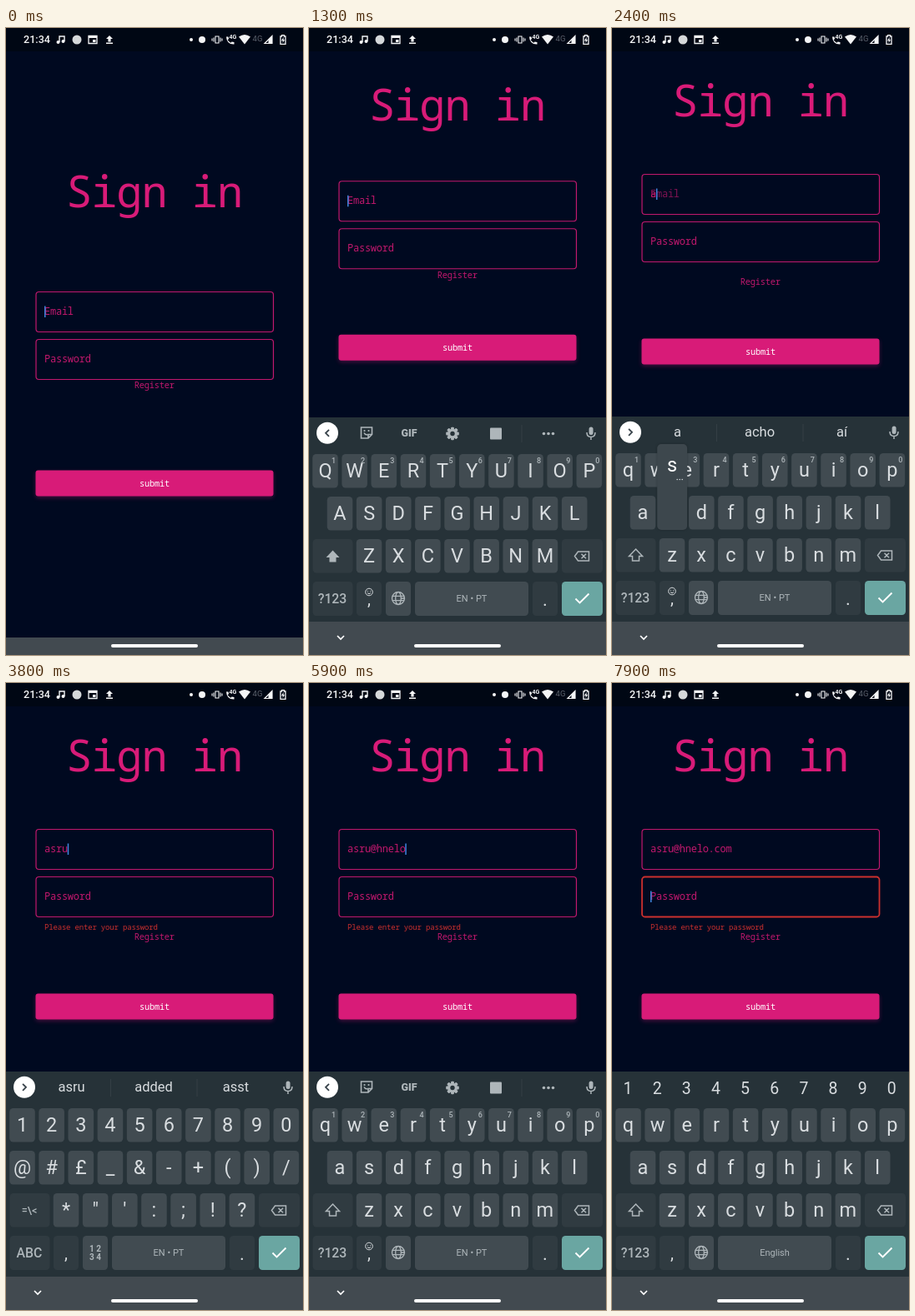
These frames come from a looping animation (356 by 752 pixels, 8000 ms). An HTML page with a canvas:

```html
<!DOCTYPE html>
<html lang="en">
<head>
<meta charset="utf-8">
<title>Sign in</title>
<style>
html, body { margin: 0; width: 100%; height: 100%; overflow: hidden; background: #000920; }
canvas { display: block; width: 356px; height: 752px; }
</style>
</head>
<body>
<canvas id="stage"></canvas>
<script>
const W = 356, H = 752, LOOP = 8000;
const canvas = document.getElementById('stage');
const ctx = canvas.getContext('2d');
const dpr = window.devicePixelRatio || 1;
canvas.width = W * dpr;
canvas.height = H * dpr;

const SANS = 'Roboto, sans-serif';
const MONO = '"Noto Sans Mono", "DejaVu Sans Mono", monospace';
const PINK = '#d81b78', LABEL = '#c2186e', RED = '#cb302e';
const BOARD = '#263238', KEY = '#414b51', DARK = '#303b41', INK = '#d9dde0', DIM = '#aeb6ba';

// Each typed character and the moment it lands in the field
const TYPED = [
  ['a', 2350], ['s', 2430], ['r', 2470], ['u', 2500], ['@', 4150],
  ['h', 5000], ['n', 5420], ['e', 5560], ['l', 5660], ['o', 5760],
  ['.', 6200], ['c', 6850], ['o', 6960], ['m', 7080]
];
const FOCUS_PASSWORD = 7450;

// Vertical places: title baseline, then centres of email, password, link, button
const IDLE = [214.5, 340.5, 397.5, 429, 546];
const RAISED = [110.5, 207.5, 264.5, 296.5, 383];
const CHECKED = [106, 199.5, 256.5, 304.5, 388];

const LETTERS = ['qwertyuiop', 'asdfghjkl', 'zxcvbnm'];
const SYMBOLS = ['1234567890', '@#£_&-+()/', '*"\':;!?'];
const ROW_TOP = [510, 561, 612, 663];
const PITCH = 35.15;

const clamp = v => Math.max(0, Math.min(1, v));
const mix = (a, b, k) => a + (b - a) * k;

function rect(x, y, w, h, r, color) {
  ctx.beginPath();
  ctx.roundRect(x, y, w, h, r);
  ctx.fillStyle = color;
  ctx.fill();
}

function disc(x, y, r, color) {
  ctx.beginPath();
  ctx.arc(x, y, r, 0, Math.PI * 2);
  ctx.fillStyle = color;
  ctx.fill();
}

function text(str, x, y, size, color = INK, weight = 400, align = 'center') {
  ctx.font = `${weight} ${size}px ${SANS}`;
  ctx.textAlign = align;
  ctx.fillStyle = color;
  ctx.fillText(str, x, y);
}

function mono(str, x, y, size, color, align = 'left') {
  ctx.font = `400 ${size}px ${MONO}`;
  ctx.letterSpacing = `${-0.02 * size}px`;
  ctx.textAlign = align;
  ctx.fillStyle = color;
  ctx.fillText(str, x, y);
  ctx.letterSpacing = '0px';
}

function line(d, x, y, color, width = 1.4) {
  ctx.save();
  ctx.translate(x, y);
  ctx.strokeStyle = color;
  ctx.lineWidth = width;
  ctx.stroke(new Path2D(d));
  ctx.restore();
}

function shape(d, x, y, color) {
  ctx.save();
  ctx.translate(x, y);
  ctx.fillStyle = color;
  ctx.fill(new Path2D(d), 'evenodd');
  ctx.restore();
}

function statusBar() {
  rect(0, 0, W, 28, 0, '#000714');
  const c = '#f4f5f6';
  text('21:34', 21, 18.2, 12.6, c, 500, 'left');
  line('M-2 3V-4H4V2', 66, 14, c, 1.4);
  disc(62.5, 17, 2, c);
  disc(68.5, 16, 2, c);
  disc(85, 14, 5.5, '#d5d8da');
  line('M-5-4.5H5V4.5H-5Z', 104, 14, c, 1.3);
  shape('M-5-5H5V-2H-5ZM0 0H3.5V3H0Z', 104, 14, c);
  shape('M0-5L4-1H1.6V2.5H-1.6V-1H-4ZM-4 3.5H4V5H-4Z', 124, 14, c);

  disc(222, 14, 2, c);
  disc(235, 14, 4, c);
  line('M-2-4H2V4H-2ZM-4-2.5V2.5M4-2.5V2.5M-6-1.5V1.5M6-1.5V1.5', 253, 14, c, 1.1);
  shape('M-5-4H-2.5L-2-1.5L-3.3-.3Q-2 2 .4 3.2L1.6 2L4.5 2.6V5Q-4.6 5.4-5-4Z', 269, 14.5, c);
  text('4G', 272, 13, 7, c, 700);
  shape('M0 6L-7-3Q0-8 7-3Z', 286, 13.5, c);
  text('4G', 301.5, 15.5, 9.5, '#5b616c');
  line('M4.5 4.5V-4.5L-4.5 4.5Z', 314.5, 14, c, 1.2);
  shape('M4.5 4.5V-4.5L0 0V4.5Z', 314.5, 14, c);
  line('M-3-4H-1.4V-5.3H1.4V-4H3V5.3H-3Z', 332, 14, c, 1.3);
  shape('M.6-3L-2 1.2H-.3V4L2 0H.6Z', 332, 14, c);
}

function field(cy, color, width) {
  ctx.beginPath();
  ctx.roundRect(36, cy - 24, 284.5, 48, 3.5);
  ctx.strokeStyle = color;
  ctx.lineWidth = width;
  ctx.stroke();
}

function caret(x, cy) {
  rect(x, cy - 7, 1.5, 13.5, 0, '#3f86e0');
}

function form(t, lift) {
  const checked = t >= 2350;
  const [title, email, pass, link, button] =
    IDLE.map((y, i) => checked ? CHECKED[i] : mix(y, RAISED[i], lift));
  const onPass = t >= FOCUS_PASSWORD;
  const value = TYPED.filter(k => t >= k[1]).map(k => k[0]).join('');

  mono('Sign in', 72, title, 52, PINK);

  field(email, LABEL, 1.2);
  field(pass, onPass ? RED : LABEL, onPass ? 1.8 : 1.2);
  ctx.globalAlpha = 1 - clamp((t - 2350) / 150);
  mono('Email', 46, email + 3.3, 12, LABEL);
  ctx.globalAlpha = 1;
  mono(value, 46, email + 3.3, 12, LABEL);
  mono('Password', 46, pass + 3.3, 12, LABEL);

  const resets = [-200, 1200, ...TYPED.map(k => k[1]), FOCUS_PASSWORD];
  const since = resets.filter(r => r <= t).pop();
  if (Math.floor((t - since) / 500) % 2 === 0) {
    if (onPass) caret(46, pass);
    else caret(46 + value.length * 6.93, email);
  }

  ctx.globalAlpha = clamp((t - 2420) / 170);
  mono('Please enter your password', 46, pass + 39.5, 9, RED);
  ctx.globalAlpha = 1;
  mono('Register', 177.7, link + 3, 10.35, LABEL, 'center');

  ctx.save();
  ctx.shadowColor = 'rgba(216,27,120,.32)';
  ctx.shadowBlur = 5 * dpr;
  ctx.shadowOffsetY = 2 * dpr;
  rect(35.5, button - 15.5, 285, 31, 3, PINK);
  ctx.restore();
  mono('submit', 178, button + 3.5, 10.35, '#fff', 'center');
}

function mic() {
  rect(335.6, 477.5, 5, 9.5, 2.5, DIM);
  line('M-5-1Q-5 4.5 0 4.5Q5 4.5 5-1M0 4.5V8', 338, 485, DIM, 1.5);
}

function divider(x) {
  rect(x, 475, 1, 21, 0, '#343f45');
}

function toolbar() {
  disc(22, 484.8, 13, '#fff');
  line('M2-4L-2 0L2 4', 22, 484.8, '#37424a', 1.8);
  line('M-6.5-6.5H6.5V2L2 6.5H-6.5ZM6.5 2H2V6.5M-3 0Q-1.5 3 1 2', 69, 484.5, DIM, 1.6);
  disc(66.5, 482, 1.1, DIM);
  disc(71.5, 482, 1.1, DIM);
  text('GIF', 120, 489, 12.5, DIM, 900);
  for (let i = 0; i < 4; i++) {
    ctx.save();
    ctx.translate(172, 485.5);
    ctx.rotate(i * Math.PI / 4);
    rect(-1.9, -7.8, 3.8, 15.6, 1, DIM);
    ctx.restore();
  }
  disc(172, 485.5, 5.8, DIM);
  disc(172, 485.5, 2.7, BOARD);
  rect(217, 478.5, 14, 14, 1, DIM);
  divider(254.5);
  [281.5, 287, 292.5].forEach(x => disc(x, 485.5, 1.8, DIM));
  mic();
}

function suggestions(words) {
  disc(22, 484.8, 13, '#fff');
  line('M-2-4L2 0L-2 4', 22, 484.8, '#37424a', 1.8);
  words.forEach((w, i) => text(w, 78.5 + i * 98.5, 490.3, 16.5));
  divider(125);
  divider(228.5);
  mic();
}

function keyRow(row, chars, start, hints) {
  const top = ROW_TOP[row];
  [...chars].forEach((ch, i) => {
    const cx = start + i * PITCH;
    rect(cx - 15.3, top, 30.6, 40.5, 4.5, KEY);
    text(ch, cx, top + 27.8, 23.5);
    if (hints) text((i + 1) % 10, cx + 10, top + 10.5, 9, DIM, 500);
  });
}

function bottomRow(mode) {
  const top = ROW_TOP[3];
  const sym = mode === 'symbols', pw = mode === 'password';
  rect(4.5, top, 48, 41, 4.5, DARK);
  text(sym ? 'ABC' : '?123', 28, top + 25.7, 15.8, DIM, 500);
  rect(57, top, 30, 41, 4.5, DARK);
  text(',', 72, top + 28, 20);
  if (mode === 'upper' || mode === 'lower') {
    ctx.beginPath();
    ctx.arc(72, 675.5, 4.3, 0, Math.PI * 2);
    ctx.strokeStyle = INK;
    ctx.lineWidth = 1;
    ctx.stroke();
    line('M-2 1Q0 3.5 2 1M-1.7-1.6V-.6M1.7-1.6V-.6', 72, 675.5, INK, 1);
  }
  rect(92, top, 30, 41, 4.5, KEY);
  if (sym) {
    text('1 2', 107, 682, 10, DIM, 700);
    text('3 4', 107, 692, 10, DIM, 700);
  } else {
    ctx.strokeStyle = DIM;
    ctx.lineWidth = 1.3;
    ctx.beginPath();
    ctx.arc(107, 683, 7.5, 0, Math.PI * 2);
    ctx.ellipse(107, 683, 3.3, 7.5, 0, 0, Math.PI * 2);
    ctx.stroke();
    line('M-7-2.6H7M-7 2.6H7', 107, 683, DIM, 1.3);
  }
  rect(127, top, 136, 41, 4.5, KEY);
  text(pw ? 'English' : 'EN • PT', 195, 687, 11, DIM);
  rect(268, top, 30, 41, 4.5, DARK);
  text('.', 283, top + 29, 22);
  rect(303, top, 49, 41, 4.5, '#6aa6a2');
  line('M-8 0L-3 5L8-6', 327.5, 683.5, '#fff', 1.9);
}

function thirdRowEnds(mode) {
  rect(4.5, 612, 48, 40.5, 4.5, DARK);
  const arrow = 'M0-7.5L8 1H4V6.5H-4V1H-8Z';
  if (mode === 'symbols') text('=\\<', 28, 637, 12.5, DIM, 500);
  else if (mode === 'upper') shape(arrow, 28.5, 633, DIM);
  else line(arrow, 28.5, 632.5, DIM, 1.5);
  rect(303, 612, 49, 40.5, 4.5, DARK);
  line('M-8 0L-4-5.5H9V5.5H-4ZM0-2.8L5.6 2.8M5.6-2.8L0 2.8', 326.5, 632.5, DIM, 1.5);
}

function keyPlace(ch) {
  if (ch === '.') return [283, 3];
  if (ch === '@') return [19.5, 1];
  const row = LETTERS.findIndex(r => r.includes(ch));
  return [[19.5, 37, 72][row] + LETTERS[row].indexOf(ch) * PITCH, row];
}

function popup(ch, mode) {
  const [cx, row] = keyPlace(ch);
  const top = ROW_TOP[row];
  ctx.save();
  ctx.shadowColor = 'rgba(0,0,0,.25)';
  ctx.shadowBlur = 3 * dpr;
  rect(cx - 18, top - 62, 36, 103, 5, '#3d474d');
  ctx.restore();
  text(mode === 'upper' ? ch.toUpperCase() : ch, cx, top - 29.5, 23.5, '#fff');
  [6, 9, 12].forEach(dx => disc(cx + dx, top - 19.5, 0.8, INK));
}

function keyboardMode(t) {
  if (t < 2350) return 'upper';
  if (t < 3400) return 'lower';
  if (t < 4400) return 'symbols';
  return t < 7600 ? 'lower' : 'password';
}

function keyboard(t, lift) {
  const mode = keyboardMode(t);
  ctx.save();
  ctx.translate(0, Math.round((1 - lift) * 286));
  rect(0, 466, W, 286, 0, BOARD);

  if (mode === 'password') {
    [...SYMBOLS[0]].forEach((d, i) => text(d, 19 + i * PITCH, 493, 19.5));
  } else if (t >= 2350 && t < 4150) {
    suggestions(t < 2600 ? ['a', 'acho', 'aí'] : ['asru', 'added', 'asst']);
  } else {
    toolbar();
  }

  const sym = mode === 'symbols';
  const rows = sym ? SYMBOLS
    : mode === 'upper' ? LETTERS.map(r => r.toUpperCase()) : LETTERS;
  keyRow(0, rows[0], 19.5, !sym && mode !== 'password');
  keyRow(1, rows[1], sym ? 19.5 : 37, false);
  keyRow(2, rows[2], 72, false);
  thirdRowEnds(mode);
  bottomRow(mode);

  for (const [ch, at] of TYPED) {
    if (t >= at - 60 && t < at + 40) popup(ch, mode);
  }
  ctx.restore();
}

function navBar(lift) {
  const top = Math.round(mix(731, 711.5, lift));
  rect(0, top, W, H - top, 0, '#424a50');
  if (lift > 0.5) line('M-4-2L0 2L4-2', 38, 731, '#fff', 1.7);
  rect(126, 739, 104, 4, 2, '#fff');
}

function draw(t) {
  ctx.setTransform(dpr, 0, 0, dpr, 0, 0);
  rect(0, 0, W, H, 0, '#000920');
  const lift = 1 - Math.pow(1 - clamp((t - 1100) / 230), 3);
  form(t, lift);
  statusBar();
  if (lift > 0) keyboard(t, lift);
  navBar(lift);
}

const start = performance.now();
function tick() {
  draw((performance.now() - start) % LOOP);
  requestAnimationFrame(tick);
}
tick();
</script>
</body>
</html>
```
